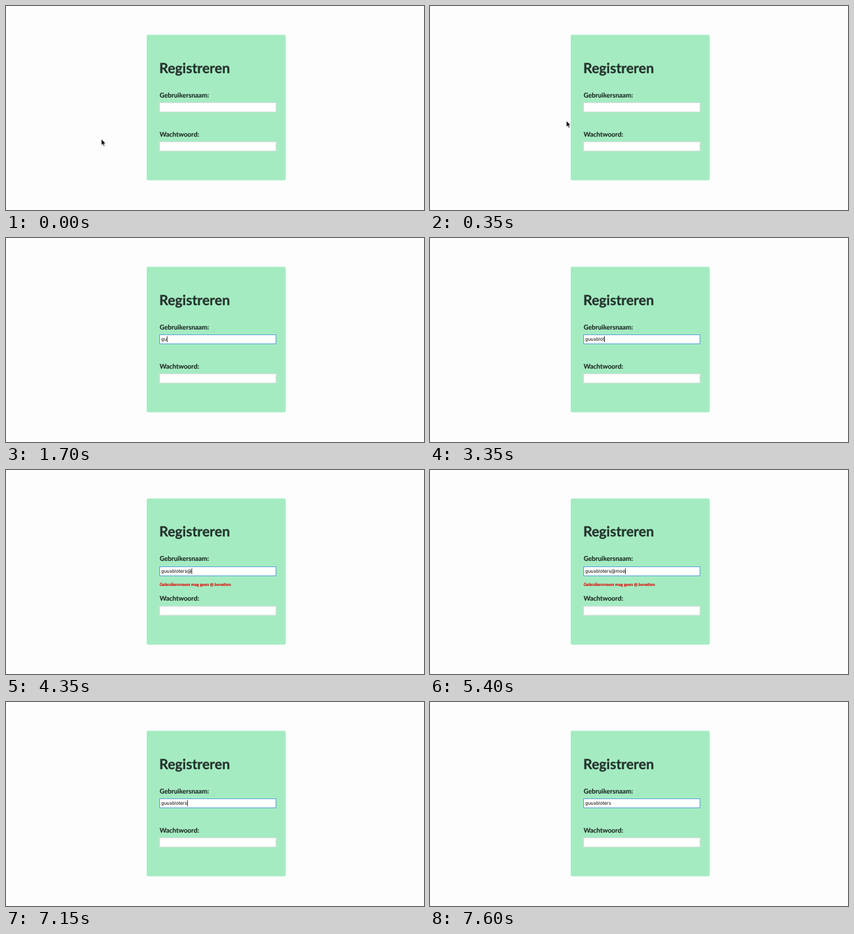
These frames come from a looping animation (600 px wide and 292 px high, 8 s). An HTML page:

```html
<!DOCTYPE html>
<html lang="nl">
<head>
<meta charset="utf-8">
<title>Registreren</title>
<style>
  html, body { margin: 0; width: 100%; height: 100%; overflow: hidden; background: #fdfdfd; }
  svg { display: block; width: 600px; height: 292px; }
  text { font-family: Lato, "Open Sans", sans-serif; font-weight: 700; text-rendering: geometricPrecision; white-space: pre; }
  .title { font-size: 19.95px; fill: #22302a; stroke: #22302a; stroke-width: 0.25; }
  .label { font-size: 9.42px; fill: #1b2721; stroke: #1b2721; stroke-width: 0.1; }
  .error { font-size: 6.02px; fill: #e3080b; stroke: #e3080b; stroke-width: 0.15; }
  .value { font-family: Inter, "Liberation Sans", sans-serif; font-weight: 400; font-size: 6.67px; fill: #000; }
  .field { fill: #fff; stroke: #dcdfdd; stroke-width: 1; }
  .focus { fill: #fff; stroke: #5aaadd; stroke-width: 1; filter: drop-shadow(0 0 0.6px #5aaadd); }
</style>
</head>
<body>
<svg viewBox="0 0 600 292">
  <rect id="card" x="202" width="199.6" rx="2.5" fill="#a5ebc2"/>
  <g id="upper">
    <text class="title" x="220" y="95.7">Registreren</text>
    <text class="label" x="220.4" y="130.6">Gebruikersnaam:</text>
  </g>
  <rect id="user" class="field" x="220.5" y="138.5" width="167" height="13"/>
  <text id="value" class="value" x="222.8" y="147.3"></text>
  <rect id="caret" y="140.6" width="0.8" height="8.6" fill="#111"/>
  <text id="error" class="error" x="220.4" y="166">Gebruikersnaam mag geen @ bevatten</text>
  <g id="lower">
    <text class="label" x="220.4" y="186.6">Wachtwoord:</text>
    <rect class="field" x="220.5" y="194.6" width="167" height="12.8"/>
  </g>
  <path id="arrow" d="M0 0V8.6L2 6.8L3.3 9.9L4.7 9.3L3.4 6.3H6Z" fill="#000" stroke="#fff" stroke-width="0.5"/>
  <path id="beam" d="M-2 -4.2Q0 -4.2 0 -3Q0 -4.2 2 -4.2M0 -3V3M-2 4.2Q0 4.2 0 3Q0 4.2 2 4.2M-1 0.9H1" fill="none" stroke="#111" stroke-width="0.9"/>
</svg>
<script>
const LOOP = 8000, FOCUS = 700, BLINK = 500;
const FULL = "guusbloters@moeil";

// [time, number of characters in the field]
const KEYS = [
  [1550, 1], [1700, 2], [1800, 3], [1900, 4],
  [3050, 5], [3200, 6], [3250, 7], [3350, 8], [3450, 9], [3600, 10], [3750, 11],
  [4350, 12], [4550, 13], [4750, 14], [5400, 15], [5500, 16], [5700, 17],
  [5900, 16], [6450, 15], [6650, 14], [6800, 13], [6950, 12], [7150, 11]
];

const $ = id => document.getElementById(id);
const [card, upper, lower, user, value, caret, error, arrow, beam] =
  ["card", "upper", "lower", "user", "value", "caret", "error", "arrow", "beam"].map($);

const show = (el, on) => el.setAttribute("visibility", on ? "visible" : "hidden");
const move = (el, x, y) => el.setAttribute("transform", `translate(${x} ${y})`);

function drawForm(t) {
  let count = 0, last = FOCUS + 50;
  for (const [time, n] of KEYS) if (t >= time) { count = n; last = time; }

  const focused = t >= FOCUS;
  const invalid = count > 11;
  user.setAttribute("class", focused ? "focus" : "field");
  value.textContent = FULL.slice(0, count);

  const width = count ? value.getComputedTextLength() : 0;
  caret.setAttribute("x", 222.8 + width);
  const phase = Math.floor((t - last + 50) / BLINK);
  show(caret, focused && phase % 2 === 0);

  // the message makes the centred card one pixel taller
  const grow = invalid ? 0.5 : 0;
  card.setAttribute("y", 41.2 - grow);
  card.setAttribute("height", 208.3 + 2 * grow);
  move(upper, 0, -grow);
  move(lower, 0, grow);
  show(error, invalid);
}

function drawPointer(t) {
  const p = Math.min(1, Math.floor(t / 50) * 50 / 650);
  const k = p * p * (3 - 2 * p);
  const x = 137 + 105.7 * k, y = 190.6 - 46.8 * k;
  const inside = x > 220 && y > 138 && y < 152;
  move(arrow, x, y);
  move(beam, x, y);
  show(arrow, !inside);
  show(beam, inside && t < KEYS[0][0]);
}

const start = performance.now();
function frame() {
  const t = (performance.now() - start) % LOOP;
  drawForm(t);
  drawPointer(t);
  requestAnimationFrame(frame);
}
frame();
</script>
</body>
</html>
```
